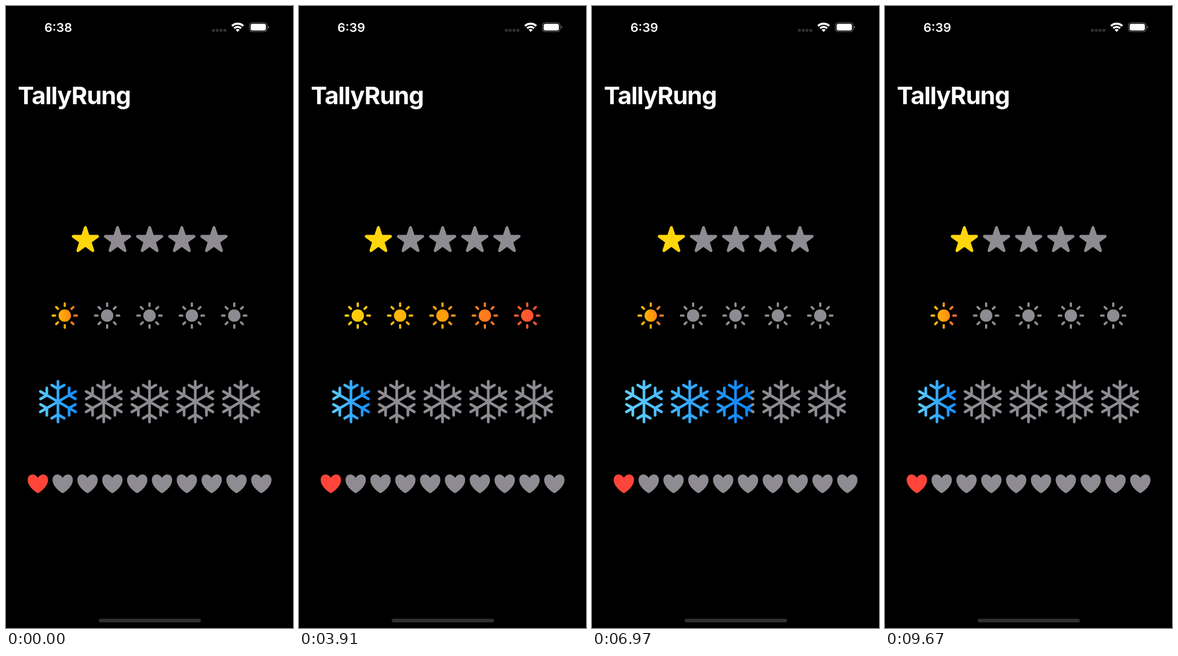
Write an HTML page that moves like this. It is 508 by 1102 pixels and loops after 9.7 s.

```html
<!DOCTYPE html>
<html lang="en">
<head>
<meta charset="utf-8">
<style>
  html, body { margin: 0; width: 100%; height: 100%; overflow: hidden; background: #000; }
  svg { display: block; }
  text { font-family: Inter, sans-serif; fill: #fff; }
</style>
</head>
<body>
<svg id="stage" width="508" height="1102" viewBox="0 0 508 1102">
  <text id="clock" x="68" y="46" font-size="22" font-weight="600">6:38</text>
  <g id="signal" fill="#333"></g>
  <g id="wifi" fill="none" stroke="#fff"></g>
  <rect x="431" y="29.5" width="31" height="16" rx="5" fill="none" stroke="#67676b" stroke-width="1.2"/>
  <rect x="433" y="31.5" width="27" height="12" rx="3.4" fill="#fff"/>
  <path d="M463.8 35q2.2 .6 2.2 2.5t-2.2 2.5z" fill="#67676b"/>
  <text x="21" y="173.5" font-size="43" font-weight="700" letter-spacing="-1.1">TallyRung</text>
  <g id="rows"></g>
  <rect x="164" y="1085.5" width="181" height="6.5" rx="3.2" fill="#303030"/>
</svg>
<script>
const LOOP = 9700;
const $ = id => document.getElementById(id);
const range = (n, f) => Array.from({ length: n }, (_, i) => f(i));
const polar = (r, deg) => {
  const a = deg * Math.PI / 180;
  return `${(r * Math.sin(a)).toFixed(2)} ${(-r * Math.cos(a)).toFixed(2)}`;
};

// Icons are drawn in white around the origin and used as masks.
const star = `<path stroke-width="5" stroke-linejoin="round" d="M${
  range(10, i => polar(i % 2 ? 8.7 : 22.6, i * 36)).join('L')}Z"/>`;

const sun = `<circle r="11" stroke="none"/><path stroke-width="4" stroke-linecap="round" d="${
  range(8, i => `M${polar(17, i * 45)}L${polar(21.5, i * 45)}`).join('')}"/>`;

const flakeArm = `<path d="M0 0V-36.1M-11.2 -29.3L0 -22.8L11.2 -29.3"/>`;
const flake = `<g fill="none" stroke-width="4.8" stroke-linecap="round" stroke-linejoin="round">${
  range(6, i => `<g transform="rotate(${i * 60})">${flakeArm}</g>`).join('')}</g>`;

const halfHeart = s => `C${2 * s} -14 ${5.5 * s} -16.5 ${9.5 * s} -16.5C${14.5 * s} -16.5 ${18 * s} -12.6 ${
  18 * s} -7C${18 * s} 2.5 ${10 * s} 10 ${2 * s} 15.8Q${s} 16.5 0 16.5Z`;
const heart = `<path stroke="none" d="M0 -10.5${halfHeart(-1)}M0 -10.5${halfHeart(1)}"/>`;

// Each move is [start, end, from, to].
const rows = [
  { icon: star, x: 140.5, y: 415.1, pitch: 56.9, count: 5, colors: ['#ffd60a'],
    moves: [[1040, 1390, 1, 4], [2255, 2640, 4, 1]] },
  { icon: sun, x: 104, y: 548.5, pitch: 75, count: 5, colors: ['#ffd60a', '#ff9f0a', '#ff453a'],
    moves: [[3345, 3760, 1, 5], [4595, 4970, 5, 1]] },
  { icon: flake, x: 92, y: 701, pitch: 81, count: 5, colors: ['#64d2ff', '#0a84ff'],
    moves: [[5655, 6060, 1, 5], [6775, 7150, 5, 1]] },
  { icon: heart, x: 56.4, y: 846.5, pitch: 43.95, count: 10, colors: ['#ff453a'],
    moves: [[7985, 8390, 1, 7], [9285, 9670, 7, 1]] }
];

$('rows').innerHTML = rows.map((row, n) => {
  const { icon, x, y, pitch, count, colors } = row;
  const box = `x="${x - pitch / 2}" y="${y - 45}" height="90"`;
  const full = `${box} width="${pitch * count}"`;
  const stops = colors.map((c, i) =>
    `<stop offset="${i / Math.max(1, colors.length - 1)}" stop-color="${c}"/>`).join('');
  const icons = range(count, i => `<g transform="translate(${x + i * pitch} ${y})">${icon}</g>`).join('');
  return `<linearGradient id="paint${n}">${stops}</linearGradient>
    <mask id="icons${n}" maskUnits="userSpaceOnUse" ${full}><g fill="#fff" stroke="#fff">${icons}</g></mask>
    <g mask="url(#icons${n})">
      <rect ${full} fill="#8e8b92"/>
      <rect id="fill${n}" ${box} width="${pitch}" fill="url(#paint${n})"/>
    </g>`;
}).join('');

$('signal').innerHTML = range(4, i =>
  `<rect x="${364.6 + i * 6.8}" y="40.8" width="5" height="4.8" rx="1.2"/>`).join('');

const arc = (r, w) => `<path transform="translate(410 46)" stroke-width="${w}" d="M${
  polar(r, -43)}A${r} ${r} 0 0 1 ${polar(r, 43)}"/>`;
$('wifi').innerHTML = arc(14.6, 3.7) + arc(9, 3.5) + arc(2.6, 5.2);

// Ease-in-out, cubic-bezier(.42, 0, .58, 1)
function ease(p) {
  let lo = 0, hi = 1;
  for (let i = 0; i < 20; i++) {
    const s = (lo + hi) / 2, q = 1 - s;
    if (1.26 * s * q * q + 1.74 * s * s * q + s * s * s < p) lo = s; else hi = s;
  }
  return lo * lo * (3 - 2 * lo);
}

function rating(moves, t) {
  let value = 1;
  for (const [start, end, from, to] of moves) {
    if (t >= end) value = to;
    else if (t > start) value = from + (to - from) * ease((t - start) / (end - start));
  }
  return value;
}

function draw() {
  const t = performance.now() % LOOP;
  $('clock').textContent = t < 3910 ? '6:38' : '6:39';
  rows.forEach((row, n) => $('fill' + n).setAttribute('width', row.pitch * rating(row.moves, t)));
  requestAnimationFrame(draw);
}
draw();
</script>
</body>
</html>
```
